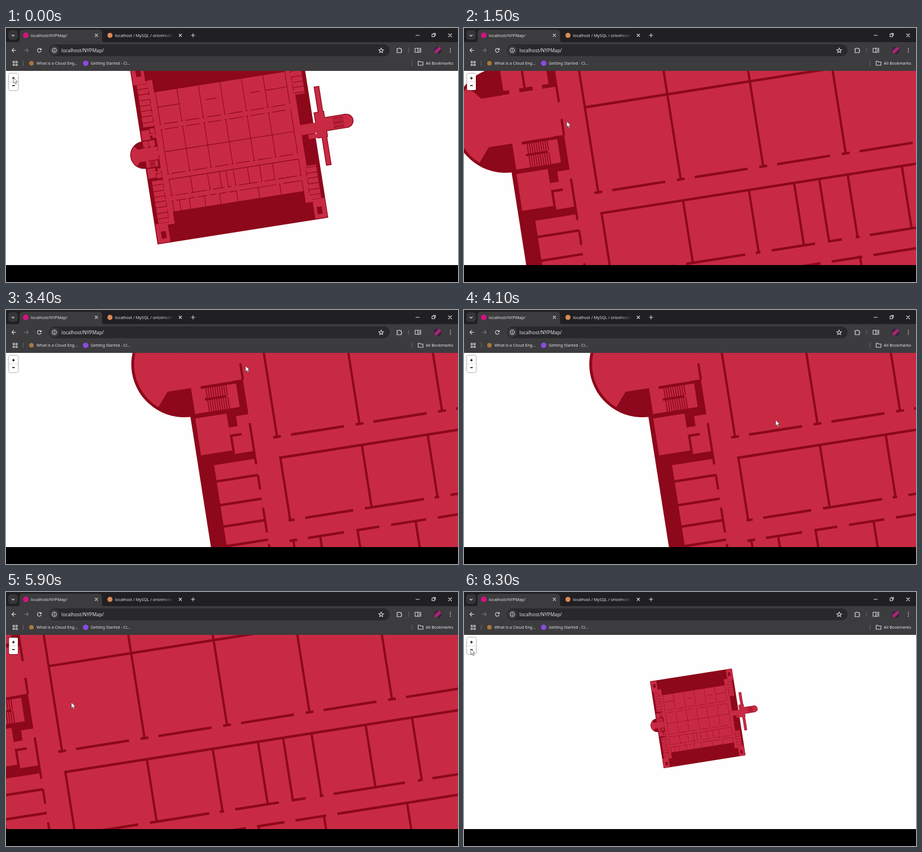
An HTML page with a canvas for the animation above (8400 ms loop, 800 px wide and 450 px high).

```html
<!DOCTYPE html>
<html lang="en">
<head>
<meta charset="utf-8">
<title>Floor map</title>
<style>
html, body { margin: 0; width: 100%; height: 100%; overflow: hidden; background: #000; }
canvas, svg { position: absolute; left: 0; top: 0; width: 800px; height: 450px; }
text { font: 7.2px "Noto Sans", "Open Sans", sans-serif; fill: #e3e2e6; }
.line { fill: none; stroke: #dddce0; stroke-width: 1.1; }
.bar { filter: drop-shadow(0 .6px 1.6px rgba(0,0,0,.6)); }
</style>
</head>
<body>
<canvas id="map" width="800" height="450"></canvas>
<svg viewBox="0 0 800 450">
  <defs>
    <linearGradient id="fade"><stop offset=".8" stop-color="#201f22" stop-opacity="0"/><stop offset="1" stop-color="#201f22"/></linearGradient>
    <linearGradient id="face" x2="1" y2="1"><stop offset=".2" stop-color="#2b1745"/><stop offset=".5" stop-color="#c22d78"/><stop offset=".8" stop-color="#1d1838"/></linearGradient>
  </defs>
  <rect width="800" height="26" fill="#201f22"/>
  <rect y="25" width="800" height="51" fill="#3c3b3e"/>
  <path d="M20 25q4 0 4-4V9q0-6 6-6H164q6 0 6 6v12q0 4 4 4z" fill="#3c3b3e"/>
  <rect x="4" y="4" width="17" height="17" rx="5" fill="#363539"/>
  <rect x="76" y="29" width="603" height="21" rx="10.5" fill="#29282b"/>
  <circle cx="35" cy="13" r="5" fill="#d4137f"/>
  <circle cx="184" cy="13" r="4.5" fill="#d98a55"/>
  <circle cx="45" cy="62.500" r="4" fill="#a8773c"/>
  <circle cx="141" cy="62.500" r="4.800" fill="#8a4be0"/>
  <circle cx="764" cy="39.500" r="6.500" fill="url(#face)"/>
  <circle cx="85.500" cy="39.500" r="8" fill="#3c3b3e"/>
  <text x="44" y="15.700">localhost/NYPMap/</text>
  <text x="193" y="15.700">localhost / MySQL / orionhotel</text>
  <rect x="193" y="4" width="104" height="18" fill="url(#fade)"/>
  <text x="98" y="42.500" style="font-size:8.4px">localhost/NYPMap/</text>
  <text x="54" y="65">What is a Cloud Eng...</text>
  <text x="150" y="65">Getting Started - Cl...</text>
  <text x="743" y="65">All Bookmarks</text>
  <g class="line">
    <path d="M10 12l2.500 2.500L15 12M157.500 10.500l5 5m0-5l-5 5M306 10.500l5 5m0-5l-5 5M331 9.500v7m-3.500-3.500h7"/>
    <path d="M725 13h7M754 11h4.500v4.500H754zM755.500 9.500h4.500v4.500M783 10l6 6m0-6l-6 6"/>
    <path d="M18 39.500h-7.500m3.500-3.500l-3.500 3.500 3.500 3.500M61.800 38a3.300 3.300 0 1 0 .3 2.500M62.500 36v2.500H60"/>
    <path d="M32 39.500h7.500m-3.500-3.500l3.500 3.500-3.500 3.500" stroke="#77767a"/>
    <circle cx="85.500" cy="39.500" r="3.700"/><path d="M85.500 39v2.500M85.500 37v1"/>
    <path d="M664 35.500l1.200 2.700 3 .3-2.300 2 .7 2.900-2.600-1.500-2.600 1.500.7-2.900-2.300-2 3-.3z"/>
    <path d="M692 36.500h2.500q1.300-2.500 2.600 0h2.400v2.500q2.500 1.200 0 2.500v2.300H692v-2.300q2.300-1.300 0-2.500z"/>
    <path d="M724 36h4.500l.5.500.5-.5H734v7h-4.500l-.5.500-.5-.5H724zM729 36.500v7M731 38.500h2M731 40.500h2"/>
    <path d="M12.500 59h2.500v2.500h-2.500zM17.500 59H20v2.500h-2.500zM12.500 64h2.500v2.500h-2.500zM17.500 64H20v2.500h-2.500z"/>
    <path d="M729.500 59h3l1 1.200h4.500V66h-8.500z"/>
    <path d="M30.500 58v9M712.500 35v9M718.500 58v9" stroke="#65646a"/>
    <path d="M786.500 35.500v1.500m0 1.700v1.500m0 1.700v1.500" stroke-width="1.500"/>
  </g>
  <rect y="420" width="800" height="30"/>
  <g class="bar">
    <rect x="5.300" y="81" width="15.700" height="29" rx="2" fill="#fff"/>
    <path d="M5.300 95.500H21" stroke="#ccc" stroke-width=".6"/>
  </g>
  <path d="M10.800 88.800h4.800M13.200 86.400v4.800M11 102h4.500" stroke="#000" stroke-width="1.300"/>
  <path id="cursor" d="M0 0V10l2.300-2.200 1.600 3.700 1.800-.8-1.600-3.500h3.200z" fill="#fff" stroke="#222" stroke-width=".6"/>
</svg>
<script>
const ctx = document.getElementById('map').getContext('2d');
const cursor = document.getElementById('cursor');
const DARK = '#8c081a', RED = '#c82a44';
const COS = .9878, SIN = .1556, LOOP = 8400, PAD = 63;

// ---- floor plan, in building coordinates ----
function box(color, l, t, r, b) {
  ctx.fillStyle = color;
  ctx.fillRect(l, t, r - l, b - t);
}
const across = (v, ...spans) => { // wall pieces along u
  for (let i = 0; i < spans.length; i += 2) box(DARK, spans[i], v - 2.2, spans[i + 1], v + 2.2);
};
const down = (u, ...spans) => { // wall pieces along v
  for (let i = 0; i < spans.length; i += 2) box(DARK, u - 2, spans[i], u + 2, spans[i + 1]);
};
function disc(color, u, v, r) {
  ctx.fillStyle = color;
  ctx.beginPath();
  ctx.arc(u, v, r, 0, 7);
  ctx.fill();
}
function mirrored(su, sv, draw) {
  ctx.save();
  if (su < 0) ctx.translate(884, 0);
  ctx.scale(su, sv);
  draw(su, sv);
  ctx.restore();
}

// rooms and stair tower at one corner
function corner(su, sv) {
  box(RED, -118, su > 0 ? 185 : 245, -44, 475);
  for (const v of [214, 256.5, 295, 330, 368, 408, 445]) if (su > 0 || v > 250) across(v, -119, -44);
  if (su > 0) down(-44, 214, 240);
  down(-44, 273, 317, 338, 370, 395, 430);
  box(RED, -140, 478, -9, 492);
  box(RED, -140, 478, -56, sv > 0 ? 610 : 626);
  box(DARK, -111, 532, -77, 582);
}

// rooms beside the round lobby
function lobbySide() {
  ctx.fillStyle = DARK;
  ctx.beginPath();
  ctx.moveTo(-179, 43.5);
  ctx.lineTo(-136, 43.5);
  ctx.lineTo(-136, 92);
  ctx.arc(-142, 0, 92, Math.PI / 2, 2.27);
  ctx.fill();
  box(DARK, -137, 43, -44, 105);
  box(RED, -138, 98, -82, 164);
  box(RED, -82, 123, -44, 171);
  box(RED, -66, 105, -44, 124);
  across(138, -82, -61);
  down(-80, 136, 171);
  down(-44, 121, 195);
}

function lobby() {
  disc(DARK, -142, 0, 94);
  disc(RED, -142, 0, 89);
  mirrored(1, 1, lobbySide);
  mirrored(1, -1, lobbySide);
  box(RED, -142, -44, -44, 42.5);
  box(RED, -138, -90, -102, -51);
  box(RED, -98, -90, -57, -51);
  box(RED, -128, -52, -110, -43);
  box(RED, -86, -52, -69, -43);
  down(-44, -105, -16, 14, 43);
  box(RED, -137, 48, -57, 90);
  box(RED, -137, 42, -120, 50);
  for (let u = -112; u < -75; u += 4) {
    box(DARK, u, 47, u + 1.6, 66);
    box(DARK, u, 69, u + 1.6, 90);
  }
  box(DARK, -116, 65.5, -77, 69.5);
}

function wing() {
  for (const [color, e] of [[DARK, 0], [RED, 5]]) {
    box(color, 1068 + e, -280 + e, 1106 - e, 264 - e);
    box(color, 1040 + e, -107 + e, 1112 - e, 72 - e);
    box(color, 1090, -64 + e, 1252, 32 - e);
    disc(color, 1252, -16, 48 - e);
  }
  box(RED, 928, -37, 1070, 33);
  box(RED, 981, 38, 1046, 68);
  across(-48, 1160, 1232);
  across(-16, 1160, 1232);
  across(16, 1160, 1232);
  for (let u = 1165; u < 1230; u += 8) box(DARK, u, -46, u + 2, 14);
}

function rooms() {
  const step = 147.8, end = 890;
  across(0, 0, end);
  down(0, -410, -187, -154, 155, 188, 304, 336, 410);
  down(end, -410, -187, -154, 155, 188, 304, 336, 410);
  for (let i = 0; i < 6; i++) {
    const u = i * step;
    if (i) down(u, -410, -189, -152, 152);
    for (const v of [-189, -152.5, 152.5]) across(v, u - 7, u + 7, u + 25, u + 120);
  }
  across(-307, 0, 148, 332, 401, 635, 700, 740, end);
  across(190, -2, end);
  for (const u of [146, 264, 345, 390, 441, 538, 621, 710]) down(u, 190, 303);
  across(302, -3, 8, 27, 113, 134, 240, 259, 267, 287, 365, 388, 413, 438, 445,
    463, 591, 614, 621, 640, 712, 733, 862, 882, end);
  across(338, -7, 7, 26, 91, 113, 154, 175, 238, 259, 300, 320, 369, 389, 444,
    464, 712, 731, 742, 762, end);
  for (const u of [48, 115, 219, 323, 440, 589, 737]) down(u, 338, 410);
}

function building() {
  box(DARK, -146, -632, 1028, 615);
  box(RED, -44, -410, 936, 410);
  box(RED, -44, -497, -9, 492);
  box(RED, 893, -497, 936, 492);
  for (const su of [1, -1]) for (const sv of [1, -1]) mirrored(su, sv, corner);
  lobby();
  wing();
  rooms();
}

// ---- motion ----
const smooth = p => p * p * (3 - 2 * p);
const glide = p => 1 - (1 - p) ** 3;
function zoomEase(x) { // cubic-bezier(0, 0, .25, 1)
  let lo = 0, hi = 1;
  for (let i = 0; i < 25; i++) {
    const s = (lo + hi) / 2;
    if (s * s * (.75 + .25 * s) < x) lo = s; else hi = s;
  }
  return smooth(hi);
}
const zoomIn = k => [400 - 457 * k, 248 - 110 * k, k];
const zoomOut = k => [400 - 324.5 * k, 248 - 116.7 * k, k];

// start, end, pose [x, y, scale], easing, same drag as before
const moves = [
  [-2, 248, zoomIn(.5), zoomEase],
  [250, 500, zoomIn(1), zoomEase],
  [600, 1050, [203, 138, 1], smooth],
  [1450, 1900, [508, 207, 1], smooth],
  [2800, 3400, [456, 74, 1], smooth],
  [4380, 5000, [102, 104, 1], smooth],
  [5000, 5400, zoomOut(1), glide, true],
  [7139, 7389, zoomOut(.5), zoomEase],
  [7439, 7689, zoomOut(.25), zoomEase],
  [7739, 7989, zoomOut(.125), zoomEase]
];
const pointer = [
  [0, 13, 88], [200, 13, 88], [500, 171, 159.5], [600, 171, 160], [1050, 431, 160],
  [1400, 171, 163], [1450, 171, 163], [1900, 475.5, 232], [2800, 475.5, 232],
  [3400, 424, 99], [3600, 424, 99], [4100, 551.5, 195], [4380, 526.5, 217.5],
  [5000, 172.5, 247.5], [5500, 172.5, 247.5], [6500, 12, 101], [LOOP, 12, 101]
];
const mix = (a, b, p) => a.map((v, i) => v + (b[i] - v) * p);

function camera(t) {
  let pose = zoomIn(.25), base = pose;
  for (const [from, to, goal, ease, same] of moves) {
    if (t < from) break;
    if (!same) base = pose;
    pose = mix(pose, goal, ease(Math.min(1, (t - from) / (to - from))));
    if (t < to) return { pose, base };
  }
  return { pose, base: pose };
}

function frame(now) {
  const t = now % LOOP;
  const { pose: [x, y, k], base: [bx, , bk] } = camera(t);
  ctx.setTransform(1, 0, 0, 1, 0, 0);
  ctx.fillStyle = '#fefefe';
  ctx.fillRect(0, 0, 800, 450);
  // only the part drawn before the current move is available
  const edge = sx => x + (sx - bx) * k / bk;
  ctx.save();
  ctx.beginPath();
  ctx.rect(edge(-PAD), 76, edge(800 + PAD) - edge(-PAD), 344);
  ctx.clip();
  ctx.transform(k * COS, -k * SIN, k * SIN, k * COS, x, y);
  building();
  ctx.restore();

  const i = pointer.findIndex(p => p[0] > t), a = pointer[i - 1], b = pointer[i];
  const [, cx, cy] = mix(a, b, smooth((t - a[0]) / (b[0] - a[0])));
  cursor.setAttribute('transform', `translate(${cx} ${cy})`);
}
const begin = performance.now();
function tick() {
  frame(performance.now() - begin);
  requestAnimationFrame(tick);
}
tick();
</script>
</body>
</html>
```
